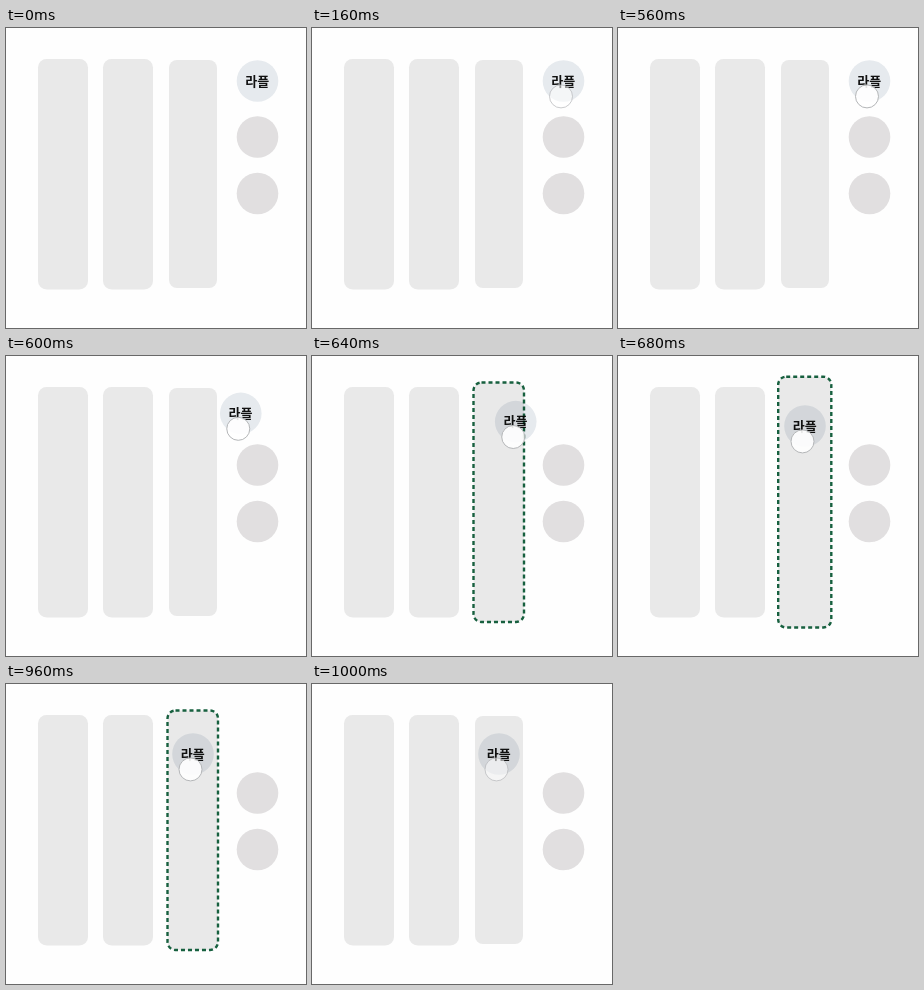
An HTML page that plays this animation: 300x300 px, repeating every 1.44 s.

```html
<!DOCTYPE html>
<html lang="ko">
<head>
<meta charset="utf-8">
<style>
  html, body { margin: 0; width: 100%; height: 100%; overflow: hidden; background: #fefefe; }
  svg { display: block; width: 100%; height: 100%; }
  #tile { mix-blend-mode: multiply; }
  text { font: 700 13px "Noto Sans CJK KR", "Noto Sans CJK", "Noto Sans CJK JP", sans-serif; text-anchor: middle; fill: #111; }
</style>
</head>
<body>
<svg viewBox="0 0 300 300">
  <rect width="300" height="300" fill="#fefefe"/>
  <g fill="#e9e9e9">
    <rect x="32" y="31" width="50" height="230.5" rx="8.5"/>
    <rect x="97" y="31" width="50" height="230.5" rx="8.5"/>
    <rect id="slot" stroke="#17603f" stroke-width="2.4" stroke-dasharray="4 3"/>
  </g>
  <g fill="#e1dfe0">
    <circle cx="251.5" cy="109" r="20.8"/>
    <circle cx="251.5" cy="165.5" r="20.8"/>
  </g>
  <g id="tile">
    <circle r="20.8" fill="#e7ebef"/>
    <text x="-.3" y="4.8">라플</text>
  </g>
  <circle id="pointer" r="11.5" fill="#fff" stroke="#b4b6b8"/>
</svg>
<script>
  const LOOP = 1440, STEP = 40;
  const $ = id => document.getElementById(id);
  const slot = $('slot'), tile = $('tile'), pointer = $('pointer');
  const mix = (a, b, k) => a + (b - a) * k;
  const clamp = v => Math.min(1, Math.max(0, v));
  const smooth = v => v * v * (3 - 2 * v);
  const set = (el, attrs) => { for (const k in attrs) el.setAttribute(k, attrs[k]); };

  // Slot edges at rest, half grown and fully grown: left, top, right, bottom
  const slotSizes = [
    [163, 32, 211, 260],
    [161.5, 26.5, 212, 266],
    [160.2, 20.7, 213.3, 271.5]
  ];
  const slotSteps = [[0, 0], [640, 1], [680, 2], [960, 1], [1000, 0]];

  function draw(t) {
    t = Math.floor(t / STEP) * STEP;

    const level = slotSteps.filter(s => s[0] <= t).pop()[1];
    const [l, top, r, b] = slotSizes[level];
    set(slot, { x: l, y: top, width: r - l, height: b - top, rx: 8, 'stroke-opacity': level ? 1 : 0 });

    const k = smooth(clamp((t - 560) / 120));
    const x = mix(251.5, 187, k), y = mix(53, 70, k);
    set(tile, { transform: `translate(${x} ${y})` });

    const held = t >= 560 && t < 1000;
    set(pointer, {
      cx: x - 2.5, cy: y + 15.4,
      'fill-opacity': held ? .9 : .55,
      'stroke-opacity': held ? 1 : .7,
      visibility: t < 160 ? 'hidden' : 'visible'
    });
  }

  const start = performance.now();
  function tick() {
    draw((performance.now() - start) % LOOP);
    requestAnimationFrame(tick);
  }
  tick();
</script>
</body>
</html>
```
